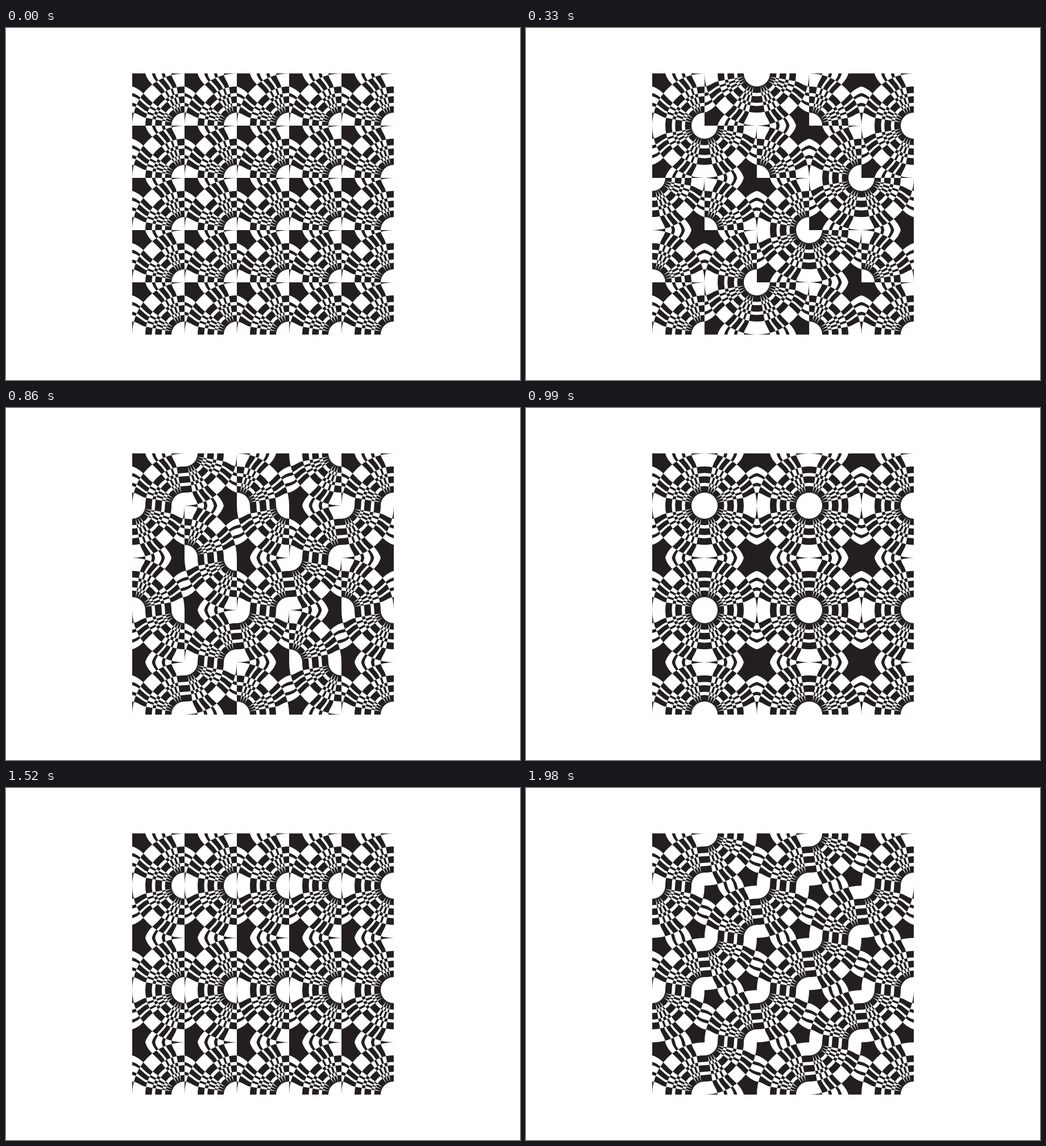
These frames come from a looping animation (904 by 620 pixels, 2.31 s). An HTML page with a canvas:

```html
<!DOCTYPE html>
<html lang="en">
<head>
<meta charset="utf-8">
<title>Turning tiles</title>
<style>
  html, body { margin: 0; width: 100%; height: 100%; overflow: hidden; background: #fff; }
  canvas { display: block; }
</style>
</head>
<body>
<canvas id="stage" width="904" height="620"></canvas>
<script>
const ctx = document.getElementById('stage').getContext('2d');
const INK = '#231f20', PAPER = '#fff';
const LEFT = 222, TOP = 80, SIZE = 92, COUNT = 5, STEP = 330;

// Wide and narrow bands alternate; rings and spokes share the spacing
const STOPS = [23, 34.5, 40.25, 51.75, 57.5, 69];
const HUB = STOPS[0], RIM = STOPS[5];

// Fan corner of a tile: [right, bottom]
const BR = [1, 1], BL = [0, 1], TR = [1, 0], TL = [0, 0];

// Each layout gives the fan corner for column c and row r
const layouts = [
  () => BR,
  (c, r) => [BR, TR, TL, BL][(c + r) % 4],
  (c, r) => [BR, TL, BL, TR][(c + r) % 4],
  (c, r) => [1 - c % 2, 1 - r % 2],
  (c, r) => [1, 1 - r % 2],
  (c, r) => [1 - (c + r) % 2, 1],
  (c, r) => (c + r) % 2 ? TL : BR
];

// Point at a distance from the hub, angle in degrees from straight up
function polar(radius, deg) {
  const a = deg * Math.PI / 180;
  return [SIZE - radius * Math.sin(a), SIZE - radius * Math.cos(a)];
}

const spokeAngle = k => 36 - 24.5 * (STOPS[k] - HUB) / (RIM - HUB);

// Area between spoke k and the nearest tile side; swap mirrors it on the diagonal
function addSpoke(path, k, swap) {
  const at = ([x, y]) => swap ? [y, x] : [x, y];
  const x = STOPS[k];
  const end = polar(RIM, spokeAngle(k));
  const reach = 0.37 * Math.hypot(end[0] - x, end[1]);
  const lean = 0.3 - 0.05 * k;
  // Spokes meet in pairs at the hub
  const pair = k - k % 2;
  const tip = polar(HUB, (spokeAngle(pair) + spokeAngle(pair + 1)) / 2);
  const pull = reach / Math.hypot(end[0] - tip[0], end[1] - tip[1]);
  path.moveTo(...at([x, 0]));
  path.bezierCurveTo(
    ...at([x + lean * reach, reach]),
    ...at([end[0] + (end[0] - tip[0]) * pull, end[1] + (end[1] - tip[1]) * pull]),
    ...at(end));
  path.lineTo(...at(tip));
  path.lineTo(SIZE, SIZE);
  path.lineTo(...at([SIZE, 0]));
  path.closePath();
}

function sector(path, radius) {
  path.moveTo(SIZE, SIZE);
  path.arc(SIZE, SIZE, radius, Math.PI, Math.PI * 1.5);
  path.closePath();
}

// Overlapping areas cancel out under the even-odd rule, giving the checks
const checks = new Path2D();
checks.rect(0, 0, SIZE, SIZE);
[...STOPS.slice(1), SIZE].forEach(radius => sector(checks, radius));
STOPS.forEach((_, k) => {
  addSpoke(checks, k, false);
  addSpoke(checks, k, true);
});
const hub = new Path2D();
sector(hub, HUB);

function drawTile(c, r, [right, bottom]) {
  ctx.save();
  ctx.translate(LEFT + (c + 0.5) * SIZE, TOP + (r + 0.5) * SIZE);
  ctx.scale(right ? 1 : -1, bottom ? 1 : -1);
  ctx.translate(-SIZE / 2, -SIZE / 2);
  ctx.fillStyle = INK;
  ctx.fill(checks, 'evenodd');
  ctx.fillStyle = PAPER;
  ctx.fill(hub);
  ctx.restore();
}

let shown = -1;

function draw(index) {
  ctx.fillStyle = PAPER;
  ctx.fillRect(0, 0, 904, 620);
  for (let r = 0; r < COUNT; r++)
    for (let c = 0; c < COUNT; c++)
      drawTile(c, r, layouts[index](c, r));
  shown = index;
}

const start = performance.now();

function tick() {
  const time = Math.max(0, performance.now() - start);
  const index = Math.floor(time / STEP) % layouts.length;
  if (index !== shown) draw(index);
  requestAnimationFrame(tick);
}
tick();
</script>
</body>
</html>
```
